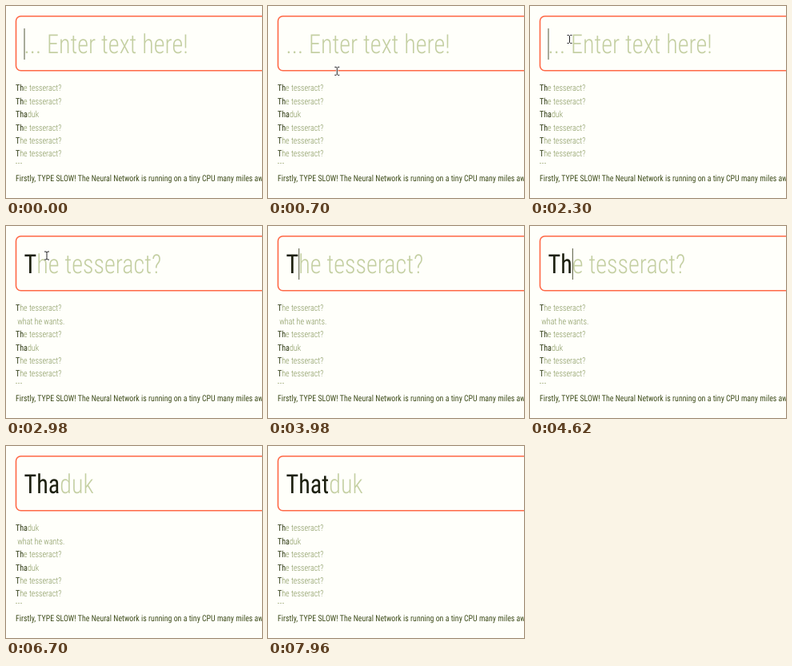
An HTML page for the animation above (8000 ms loop, 320 px wide and 240 px high).

```html
<!DOCTYPE html>
<html lang="en">
<head>
<meta charset="utf-8">
<title>Text completion</title>
<style>
  html, body { margin: 0; width: 100%; height: 100%; overflow: hidden; background: #fffffa; }
  svg { display: block; width: 100%; height: 100%; }
  text {
    font-family: "Roboto Condensed", Roboto, sans-serif;
    font-stretch: 75%;
    white-space: pre;
    text-rendering: geometricPrecision;
  }
  .field { font-size: 33px; }
  .small { font-size: 11px; }
  .typed { fill: #1d2010; }
  .ghost { fill: #c4cfa2; font-weight: 300; }
  .small .typed { fill: #2f3b14; }
  .small .ghost { fill: #84955a; }
  .note { fill: #3f4d1c; font-size: 10.8px; }
</style>
</head>
<body>
<svg viewBox="0 0 320 240">
  <rect x="12.5" y="12.8" width="340" height="68" rx="6" fill="none" stroke="#ff6947" stroke-width="1.6"/>
  <!-- The whole page is seen slightly narrowed -->
  <g transform="scale(.915 1)">
    <text class="field" x="24.6" y="59"><tspan class="typed" id="typed"></tspan><tspan class="ghost" id="ghost"></tspan></text>
    <rect id="caret" y="28" width="1.1" height="39" fill="#55593f"/>
    <g id="rows" class="small"></g>
    <text class="note" x="13.1" y="219">Firstly, TYPE SLOW! The Neural Network is running on a tiny CPU many miles away</text>
  </g>
  <path d="M12 196.5h8" stroke="#b9c29b" stroke-dasharray="2 1"/>
  <g id="mouse" fill="none">
    <path d="M-3-5h2l1 1 1-1h2M0-4V4M-3 5h2l1-1 1 1h2" stroke="#fff" stroke-width="2.4"/>
    <path d="M-3-5h2l1 1 1-1h2M0-4V4M-3 5h2l1-1 1 1h2" stroke="#222" stroke-width="1"/>
  </g>
</svg>
<script>
const LOOP = 8000, BLINK = 530;
const $ = id => document.getElementById(id);

const QUERY = "he tesseract?", NAME_END = "duk";
const PHRASES = {
  T: ["T", QUERY],
  Th: ["Th", "e tesseract?"],
  Tha: ["Tha", NAME_END],
  none: ["", " what he wants."]
};

// time, typed text, suggested ending
const FIELD = [
  [0, "", "... Enter text here!"],
  [2430, "T", QUERY],
  [4560, "Th", "e tesseract?"],
  [4800, "Tha", NAME_END],
  [7240, "That", NAME_END]
];

const HISTORY = [
  [0, "Th Th Tha Th T T"],
  [2640, "T none Th Tha T T"],
  [5120, "Tha none Th Tha T T"],
  [7620, "Th Tha Th Th T T"]
];

// time, x, y
const MOUSE = [
  [160, 325, 224], [560, 120, 110], [860, 46, 47], [1200, 48, 45],
  [2000, 48, 45], [2600, 51, 38], [3040, 51, 37], [3320, 236, -8]
];

const stepAt = (table, t) => table.findLast(step => step[0] <= t);

function svgNode(tag, parent, attributes) {
  const node = document.createElementNS("http://www.w3.org/2000/svg", tag);
  for (const [name, value] of Object.entries(attributes)) node.setAttribute(name, value);
  return parent.appendChild(node);
}

const rows = Array.from({ length: 6 }, (_, i) => {
  const line = svgNode("text", $("rows"), { x: 13.1, y: 106.3 + i * 16.4 });
  return ["typed", "ghost"].map(name => svgNode("tspan", line, { class: name }));
});

function setPair(nodes, texts) {
  nodes.forEach((node, i) => {
    if (node.textContent !== texts[i]) node.textContent = texts[i];
  });
}

function moveMouse(t) {
  const next = MOUSE.findIndex(step => step[0] > t);
  $("mouse").style.display = next > 0 ? "" : "none";
  if (next < 1) return;
  const [t0, x0, y0] = MOUSE[next - 1], [t1, x1, y1] = MOUSE[next];
  const k = (t - t0) / (t1 - t0), ease = k * k * (3 - 2 * k);
  $("mouse").setAttribute("transform",
    `translate(${x0 + (x1 - x0) * ease} ${y0 + (y1 - y0) * ease})`);
}

function render(t) {
  const [since, typed, ending] = stepAt(FIELD, t);
  setPair([$("typed"), $("ghost")], [typed, ending]);

  const width = typed ? $("typed").getComputedTextLength() : 0;
  $("caret").setAttribute("x", 24.6 + width);
  $("caret").style.display = (t - since) % (2 * BLINK) < BLINK ? "" : "none";

  stepAt(HISTORY, t)[1].split(" ").forEach((key, i) => setPair(rows[i], PHRASES[key]));
  moveMouse(t);
}

const start = performance.now();
function tick() {
  render((performance.now() - start) % LOOP);
  requestAnimationFrame(tick);
}
tick();
</script>
</body>
</html>
```
